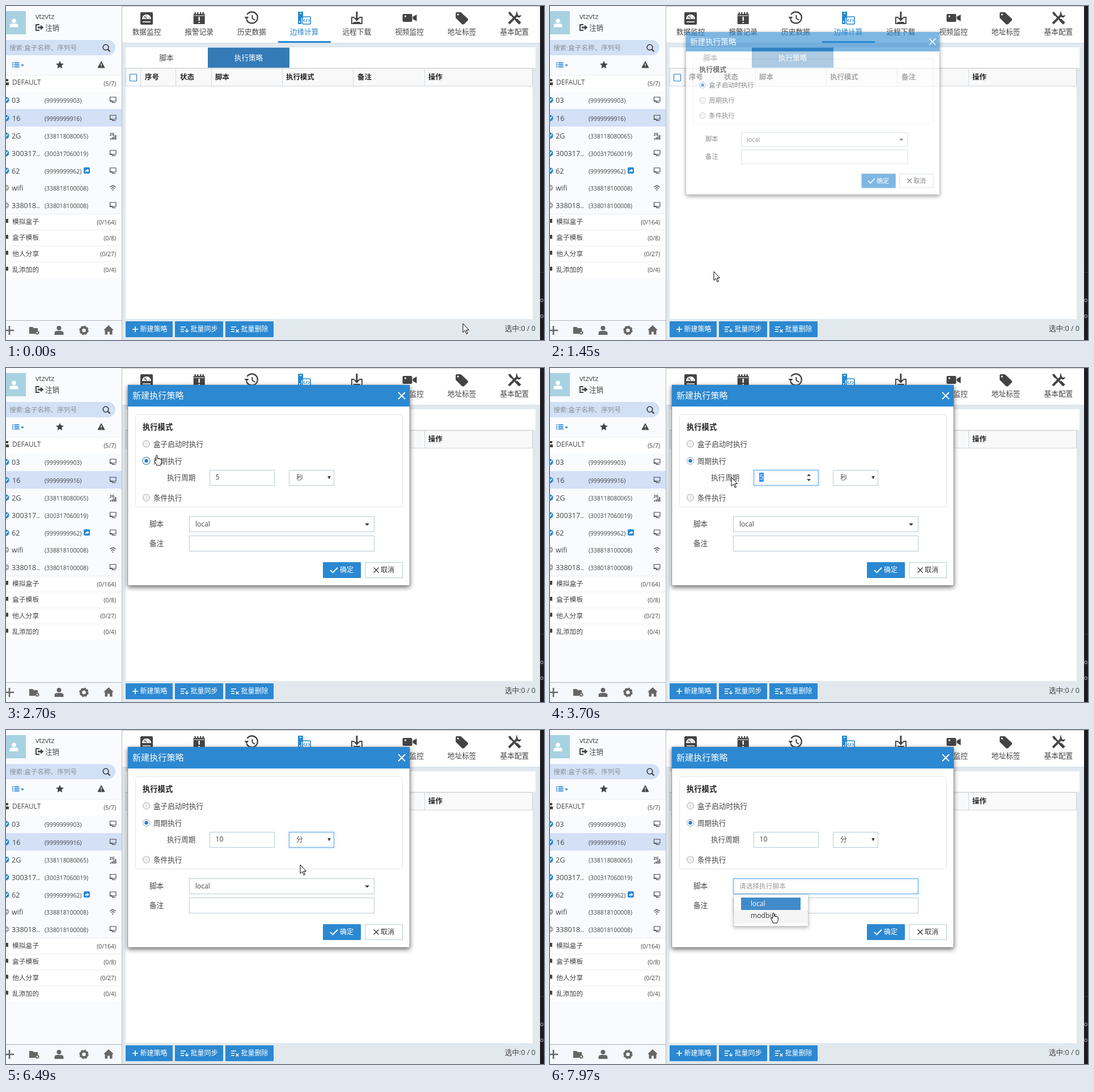
An HTML page that plays this animation: 949x590 px, repeating every 8000 ms.

```html
<!DOCTYPE html>
<html lang="zh-CN">
<head>
<meta charset="utf-8">
<title>边缘计算</title>
<style>
  html, body { margin: 0; width: 100%; height: 100%; overflow: hidden; background: #e1e9ef; }
  svg { display: block; }
  text { font-family: "Open Sans", "Noto Sans CJK SC", "Noto Sans CJK", sans-serif; white-space: pre; }
  .shadow { filter: drop-shadow(0 3px 4px rgba(0, 0, 0, .6)); }
  .menu { filter: drop-shadow(0 3px 3px rgba(0, 0, 0, .25)); }
  .glow { fill: none; stroke: #66afe9; filter: drop-shadow(0 0 2px rgba(82, 168, 236, .8)); }
</style>
</head>
<body>
<svg id="stage" width="949" height="590" viewBox="0 0 949 590"></svg>
<script>
const BLUE = '#2b88d1', INK = '#444', EDGE = '#b9c9d8', LOOP = 8000;

// Drawing helpers; text is placed by its vertical centre.
const R = (x, y, w, h, fill, more = '') =>
  `<rect x="${x}" y="${y}" width="${w}" height="${h}" fill="${fill}" ${more}/>`;
const T = (x, y, s, size = 12.6, fill = INK, more = '') =>
  `<text x="${x}" y="${y + size * .36}" font-size="${size}" fill="${fill}" ${more}>${s}</text>`;
const P = (d, fill, stroke = 'none', w = 1, more = '') =>
  `<path d="${d}" fill="${fill}" stroke="${stroke}" stroke-width="${w}" ${more}/>`;
const C = (x, y, r, fill, more = '') => `<circle cx="${x}" cy="${y}" r="${r}" fill="${fill}" ${more}/>`;
const G = (x, y, body, more = '') => `<g transform="translate(${x} ${y})" ${more}>${body}</g>`;
const box = (x, y, w, h, id = '') =>
  R(x + .5, y + .5, w - 1, h - 1, '#fff', `stroke="${EDGE}" ${id && `id="${id}"`}`);
const MID = 'text-anchor="middle"', END = 'text-anchor="end"', BOLD = 'font-weight="700"';

const person = (c, k = 1) => C(0, -4 * k, 4 * k, c) +
  P(`M${-8 * k} ${8 * k}v${-3 * k}q0-${4 * k} ${5 * k}-${4 * k}h${6 * k}q${5 * k} 0 ${5 * k} ${4 * k}v${3 * k}z`, c);
const gear = (c, r) => C(0, 0, r * .66, 'none', `stroke="${c}" stroke-width="${r * .5}"`) +
  C(0, 0, r * .88, 'none', `stroke="${c}" stroke-width="${r * .3}" stroke-dasharray="${r * .42} ${r * .27}"`);
const cross = (r, c, w) => P(`M${-r} ${-r}L${r} ${r}M${r} ${-r}L${-r} ${r}`, 'none', c, w);

const headIcons = [
  R(-11, -10, 22, 22, INK, 'rx="2"') + P('M-8 2a8 8 0 0 1 16 0z', '#fff') +
    P('M0 1l-4-4M-5 0h1M4 0h1M0-4v1', 'none', INK, 1.6) + P('M-7 7H7', 'none', '#fff', 1.6),
  R(-10, -7, 20, 18, INK, 'rx="1"') + P('M-7-10v5M-2.5-10v5M2.5-10v5M7-10v5', 'none', INK, 2.4) +
    P('M-9-4H9', 'none', '#fff') + P('M0-2v7M0 7v2', 'none', '#fff', 2.4),
  P('M-9 3A10 10 0 1 0-8-6', 'none', INK, 2.4) + P('M-13-2h8l-4 5z', INK) + P('M1-5v6l5 3', 'none', INK, 2),
  P('M-11-11h9v11h-3v11h-6z', BLUE) + P('M-8-8h3', 'none', '#fff', 1.5) + C(-8, 7, 1.2, '#fff') +
    R(-3, -2, 14, 13, '#fff', `stroke="${BLUE}" stroke-width="1.6" rx="1"`) +
    P('M1 2l-2 2.5 2 2.5M7 2l2 2.5-2 2.5M5 2L3 7', 'none', BLUE, 1.1),
  P('M-4-1h-5v11h18v-11h-5', 'none', INK, 2) + P('M-1.5-11h3V0h4L0 6l-5.500-6h4z', INK) + P('M-6 8H6', 'none', INK, 2),
  R(-12, -7, 17, 14, INK, 'rx="2"') + P('M6-2l7-4v12l-7-4z', INK) + C(-7, -3, 1.6, '#fff'),
  P('M-11-8q0-2 2-2h7l12 11q2 2 0 4l-6 6q-2 1-4 0l-11-11z', INK) + C(-7, -6, 1.6, '#fff'),
  P('M-8-8L8 9', 'none', INK, 3) + P('M3 3l7 7', 'none', INK, 5) + P('M-11-9l3-2 4 5-3 3z', INK) +
    P('M-10 10L5-5', 'none', INK, 4) + P('M4-10q-2 6 2 8 3 2 5-2l-4 1-2-3z', INK, INK, 1.5)
];

const monitor = P('M-5-5H5.500V2H-5zM-2 4.500h7M0 2v2', 'none', INK, 1.1) + P('M-5.500 2h4', 'none', INK, 2);
const signal = T(-6, -3, '2G', 7, INK, BOLD) + P('M-4 7v-2M-1 7v-4M2 7v-6M5 7v-8', 'none', INK, 1.8);
const wifi = P('M-5-1q5-5 10 0M-3 1.500q3-3 6 0', 'none', INK, 1.3) + C(0, 4, 1.1, INK);

function sidebar() {
  const rows = [
    [166, '03', '9999999903', monitor], [198, '16', '9999999916', monitor], [229, '2G', '338118080065', signal],
    [260, '300317..', '300317060019', monitor], [291, '62', '9999999962', monitor],
    [321, 'wifi', '338818100008', wifi], [352, '338018..', '338018100008', monitor]];
  const groups = [['模拟盒子', 164], ['盒子模板', 8], ['他人分享', 27], ['乱添加的', 4]];
  let s = R(0, 0, 204, 590, '#f9fbfe') + R(0, 9, 35, 41, '#a8d1e1') + G(14, 30, person('#fff', .95)) +
    T(52, 18, 'vtzvtz') + P('M59 33h-6v10h6', 'none', INK, 2) + P('M56 36.500h5v-3l5.500 4.500-5.500 4.500v-3h-5z', INK) +
    T(69, 38, '注销') + R(-14, 60, 207, 27, '#d2e0f6', 'rx="13.500"') +
    T(6, 74, '搜索:盒子名称、序列号', 11.6, '#8a8f98') +
    C(176, 73, 4.8, 'none', `stroke="${INK}" stroke-width="1.8"`) + P('M179.500 76.500l4 4', 'none', INK, 2.4) +
    P('M11 100.500h2m1.500 0h9M11 104h2m1.500 0h9M11 107.500h2m1.500 0h9', 'none', BLUE, 1.9) + P('M26 103.500h6l-3 3.500z', BLUE) +
    P('M95 97l2 4.500 5 .5-3.700 3.300 1 4.900-4.300-2.500-4.300 2.500 1-4.900-3.700-3.300 5-.5z', INK) +
    P('M168 98l6 11h-12z', INK, INK) + P('M168 101.500v4m0 1.200v1.400', 'none', '#fff', 1.4) +
    R(0, 122, 204, 29, '#fff') + R(0, 122, 204, 1, '#eceff3') + R(0, 129, 4, 4, INK) + R(0, 135, 5, 5, INK) +
    T(11, 135, 'DEFAULT', 12) + T(194, 137, '(5/7)', 10.4, INK, END) + R(0, 182, 204, 31, '#d3e0f6');
  rows.forEach(([y, name, code, icon], i) => {
    const off = i > 4;
    s += C(0, y, 5.5, off ? '#aaa' : BLUE) +
      P(off ? `M-3 ${y}h6` : `M-3 ${y}l2 2.500 4-5`, 'none', '#fff', 1.6) +
      T(i == 1 ? 11 : 10, y, name) + T(68, y + 1, `(${code})`, 10.35) + G(188.5, y, icon);
  });
  s += R(137, 285, 11, 11, BLUE, 'rx="2"') + P('M139.500 293.500q0-4 4-4v-2l3 3.200-3 3v-2q-2 0-4 1.800z', '#fff');
  groups.forEach(([name, n], i) => {
    const y = 381 + i * 28.2;
    s += R(0, y - 14, 204, 28, '#fff') + R(0, y - 14, 204, 1, '#e9ecf0') + R(0, y - 5, 4, 7, INK) +
      T(11, y, name, 11.8) + T(194, y + 1, `(0/${n})`, 10.4, INK, END);
  });
  const g = '#666';
  return s + R(0, 555, 204, 1, '#aab2ba') + R(0, 556, 204, 34, '#f5f8fc') + P('M6 565v16M-2 573h16', 'none', g, 2.6) +
    P('M41 567h6l2 2h7v4l-5 6h-10z', g) + G(55, 577, gear(g, 3.6)) + G(93.5, 573, person(g)) + G(137.5, 573, gear(g, 8)) +
    P('M181 564l9 8.500h-2.500v8h-4.500v-5h-4v5h-4.500v-8h-2.500z', g) + R(204, 0, 1, 590, '#b4bbc3');
}

function button(x, w, label, icon, id) {
  return R(x, 557, w, 28, BLUE, `rx="1" id="${id}"`) + G(x, 571, icon) +
    T(x + w - 9.5, 571, label, 12, '#fff', END);
}

function page() {
  const tabs = ['数据监控', '报警记录', '历史数据', '边缘计算', '远程下载', '视频监控', '地址标签', '基本配置'];
  const cols = [[245, '序号', 237], [307, '状态', 299], [369, '脚本', 362], [494, '执行模式', 487], [620, '备注', 612], [745, '操作', 738]];
  let s = R(205, 0, 737, 590, '#e1e9ef') + R(205, 0, 737, 65, '#fff') + R(205, 65, 737, 1, '#d3dbe2');
  tabs.forEach((name, i) => {
    const x = 248 + i * 92.7;
    s += G(x, 21, headIcons[i]) + T(x, 45, name, 12.7, i == 3 ? BLUE : INK, MID);
  });
  s += R(480, 62, 93, 3, BLUE) + R(211, 73, 723, 36, '#fff') + R(356, 73.5, 144, 35.5, '#337ab7') +
    T(283, 91, '脚本', 12.6, INK, MID) + T(428, 91, '执行策略', 12.6, '#fff', MID) +
    R(211, 109, 723, 444, '#e4e6e8') + R(211, 110, 718, 443, '#fff') +
    R(211.5, 110.5, 717, 31, '#f9f9f9', 'stroke="#cfd6dd"') +
    R(218.5, 120.5, 12, 12, '#fff', 'stroke="#2a80c4" stroke-width="1.200" rx="1"');
  cols.forEach(([x, name, line]) => s += R(line, 110, 1, 31, '#cfdae4') + T(x, 126, name, 12.4, '#222', BOLD));
  const lines = 'M10-4h9M10 0h6M10 4h6';
  s += button(211, 83, '新建策略', P('M17-5v10M12 0h10', 'none', '#fff', 1.7), 'add') +
    button(298, 85, '批量同步', P(lines, 'none', '#fff', 1.6) + P('M21-1v6M18 2l3 3 3-3', 'none', '#fff', 1.4), 'sync') +
    button(387, 85, '批量删除', P(lines, 'none', '#fff', 1.6) + G(21, 3, cross(2.5, '#fff', 1.5)), 'del') +
    T(934, 569, '选中:0 / 0', 12.6, INK, END);
  return s + R(205, 0, 737, 1, '#bcc1c6') + R(0, 0, 205, 1, '#bcc1c6') + R(942, 0, 7, 590, '#1c1c20') +
    R(942, 470, 7, 1, '#3a3a40') + T(942, 519, 'or', 10, '#c9c6d6') + T(942, 547, 'or', 10, '#c9c6d6');
}

const radio = (y, id) => C(247.5, y, 6, '#efefef', 'stroke="#b0b0b0"') +
  `<g id="${id}">${C(247.5, y, 6, '#fff', 'stroke="#8fb3d6"')}${C(247.5, y, 3.2, '#1f7fd0')}</g>`;

function dialog() {
  const period = T(284, 193, '执行周期') + box(359, 180, 115, 28) + R(359.5, 180.5, 114, 27, 'none', 'class="glow" id="numGlow"') +
    `<g id="spin">${P('M453 191l3.500-4 3.500 4zM453 196l3.500 4 3.500-4z', INK)}</g>` +
    R(369, 185, 8, 16, '#3390ff', 'id="mark"') + T(369.5, 193, '5', 12.4, INK, 'id="num"') + R(0, 186, 1, 15, '#222', 'id="numCaret"') +
    box(499, 180, 80, 28) + R(499.5, 180.5, 79, 27, 'none', 'class="glow" id="unitGlow"') +
    T(512, 194, '秒', 12, '#555', 'id="unit"') + P('M567 191h6l-3 5.500z', INK);
  const low = T(260, 194, '条件执行') + C(247.5, 194, 6, '#efefef', 'stroke="#b0b0b0"') + T(253, 240, '脚本') + T(253, 274, '备注') +
    box(323, 227, 327, 28, 'script') + R(323.5, 227.5, 326, 27, 'none', 'class="glow" id="scriptGlow"') +
    T(334, 241, 'local', 12.1, INK, 'id="value"') + T(334, 241, '请选择执行脚本', 11.7, '#999', 'id="hint"') +
    R(334, 233, 1, 16, '#222', 'id="hintCaret"') + P('M633 239.500h8l-4 4z', '#333', 'none', 1, 'id="arrow"') + box(323, 261, 327, 28) +
    R(559, 308, 67, 28, BLUE, 'rx="1"') + P('M572 322l4.500 4.500 8.500-9', 'none', '#fff', 1.9) + T(589, 322, '确定', 12, '#fff') +
    box(633, 308, 67, 28) + G(653, 322, cross(4.5, '#333', 1.4)) + T(661, 322, '取消', 12, '#333') +
    `<g id="menu">${R(324, 255.5, 131.5, 56, '#fff', 'stroke="#ccc" class="menu" rx="2"')}${R(337, 261, 105, 22, '#428bca')}` +
    R(325, 284, 130, 23, '#f5f5f5', 'id="menuHover"') + T(354, 272, 'local', 12.1, '#fff') + T(354, 293, 'modbus', 12.1, '#333') + '</g>';
  const list = R(499.5, 208.5, 78, 50, '#fff', 'stroke="#7a9cc4"') + R(500, 208.5, 77, 16.5, '#1e90ff', 'id="pick"') +
    ['秒', '分', '时'].map((s, i) => T(512.5, 217 + i * 17, s, 11.5, INK, `id="opt${i}"`)).join('');
  return R(215, 30, 497, 319, '#fff', 'id="panel" class="shadow" stroke="#888" stroke-width=".6"') + R(215, 30, 497, 38, BLUE) +
    T(223, 49, '新建执行策略', 15.1, '#fff') + G(698, 49, cross(6, '#fff', 1.9)) +
    R(228.5, 82.5, 471, 128, 'none', 'id="frame" stroke="#e2e4e7" rx="4"') + T(241, 104, '执行模式', 13.3, '#222', BOLD) +
    radio(134, 'boot') + T(260, 134, '盒子启动时执行') + C(247.5, 164, 6.5, 'none', 'id="ring" stroke="#5f9bdc" stroke-width="1.500"') +
    radio(164, 'cycle') + T(260, 164, '周期执行') + `<g id="period">${period}</g><g id="low">${low}</g><g id="list">${list}</g>`;
}

const cursors =
  P('M0 0V15.500l3.600-3.300 2.600 6.100 2.300-1-2.600-5.900H10.500z', '#fff', '#000', 1, 'id="ptr"') +
  P('M-1.300 9V1.500a1.300 1.300 0 0 1 2.600 0v5c.3-1.400 2.400-1.200 2.500.3.5-1.100 2.300-.8 2.400.6.6-.8 2.100-.4 2.100 1v3.600c0 2.500-1.600 3.500-1.800 6h-7C-.8 15.300-3.200 13-4.200 10.200-4.700 8.500-2.600 8-1.300 10z',
    '#fff', '#000', 1, 'id="hand"') +
  P('M-3-5h2l1 1 1-1h2M0-4v13M-3 10h2l1-1 1 1h2', 'none', '#222', 1, 'id="beam"');

const stage = document.getElementById('stage');
stage.innerHTML = page() + sidebar() +
  `<g id="loader">${R(489, 262, 6, 12, '#bedcf3')}${R(496, 262, 1, 12, '#d9eaf7')}</g>` +
  `<g id="dialog">${dialog()}</g><g id="cursor">${cursors}</g>`;

const el = {};
stage.querySelectorAll('[id]').forEach(e => el[e.id] = e);
const set = (id, name, v) => el[id].setAttribute(name, v);
const show = (id, on) => set(id, 'opacity', +on);

// Pointer legs: start, end, steps, target x, target y, bow
const legs = [
  [70, 840, 11, 260, 564, -83], [1220, 1370, 3, 268, 541, 0], [1450, 1600, 3, 352, 253, 0],
  [1790, 1830, 2, 346, 232, 0], [1920, 2380, 7, 266, 154, 0], [2780, 3390, 9, 384, 190, 0],
  [3630, 3700, 2, 320, 193, 0], [5170, 5480, 5, 545, 193, 0], [5710, 6020, 5, 534, 229, 0],
  [6400, 6870, 7, 456, 279, 0], [7580, 7970, 6, 394, 323, 0]];
const shapes = [[0, 'ptr'], [763, 'hand'], [1295, 'ptr'], [1600, 'hand'], [1990, 'ptr'], [2300, 'hand'],
  [2780, 'ptr'], [3230, 'beam'], [3630, 'ptr'], [6710, 'hand']];

function pointer(t) {
  let x = 806, y = 561;
  for (const [a, b, n, tx, ty, bow] of legs) {
    if (t < a) break;
    const k = Math.min(n, Math.floor((t - a) / (b - a) * (n - 1) + 1.001));
    const e = (1 - Math.cos(Math.PI * k / n)) / 2;
    x += (tx - x) * e;
    y += (ty - y) * e + bow * 4 * e * (1 - e);
  }
  return [x, y];
}

function draw(t) {
  const within = (a, b = LOOP) => t >= a && t < b;
  const [x, y] = pointer(t);
  const shape = shapes.filter(s => s[0] <= t).pop()[1];
  set('cursor', 'transform', `translate(${Math.round(x)} ${Math.round(y)})`);
  for (const id of ['ptr', 'hand', 'beam']) show(id, id == shape);

  set('add', 'fill', within(763, 1450) ? '#2f7ac4' : BLUE);
  set('add', 'stroke', within(910, 1450) ? '#5b8fe0' : 'none');
  show('loader', within(1295, 1450));

  const opening = within(1450, 1525);
  set('dialog', 'opacity', t < 1450 ? 0 : opening ? .6 : 1);
  set('dialog', 'transform', opening ? 'translate(46.350 19) scale(.9)' : '');

  const cycle = t >= 2700, grow = cycle ? 35 : 0;
  show('boot', !cycle);
  show('cycle', cycle);
  show('ring', within(2700, 3560));
  show('period', cycle);
  set('panel', 'height', 319 + grow);
  set('frame', 'height', 128 + grow);
  set('low', 'transform', `translate(0 ${grow})`);

  const selected = within(3630, 4620);
  show('numGlow', within(3560, 5550));
  show('spin', within(3230, 5550));
  show('mark', selected);
  set('num', 'fill', selected ? '#fff' : INK);
  el.num.textContent = t < 4620 ? '5' : t < 4790 ? '1' : '10';
  show('numCaret', within(4620, 5320));
  set('numCaret', 'x', t < 4790 ? 376 : 383);

  const pick = t >= 5940 ? 1 : 0;
  set('unitGlow', 'opacity', t < 7040 ? Math.min(1, Math.max(0, (t - 5630) / 150)) : 0);
  el.unit.textContent = t < 6320 ? '秒' : '分';
  show('list', within(5630, 6320));
  set('pick', 'y', 208.5 + pick * 17);
  for (let i = 0; i < 3; i++) set('opt' + i, 'fill', i == pick ? '#fff' : INK);

  const open = t >= 7190, press = within(7040, 7190), hover = within(1600, 1990) || within(6710, 7040);
  set('script', 'fill', press ? '#d4d4d4' : hover ? '#e6e6e6' : '#fff');
  set('script', 'stroke', press || hover ? '#b4b8bc' : EDGE);
  show('scriptGlow', open);
  show('value', !open);
  show('arrow', !open);
  show('hint', open);
  show('hintCaret', within(7190, 7720));
  show('menu', open);
  show('menuHover', t >= 7810);
}

const start = performance.now();
function tick() {
  draw((performance.now() - start) % LOOP);
  requestAnimationFrame(tick);
}
tick();
</script>
</body>
</html>
```
